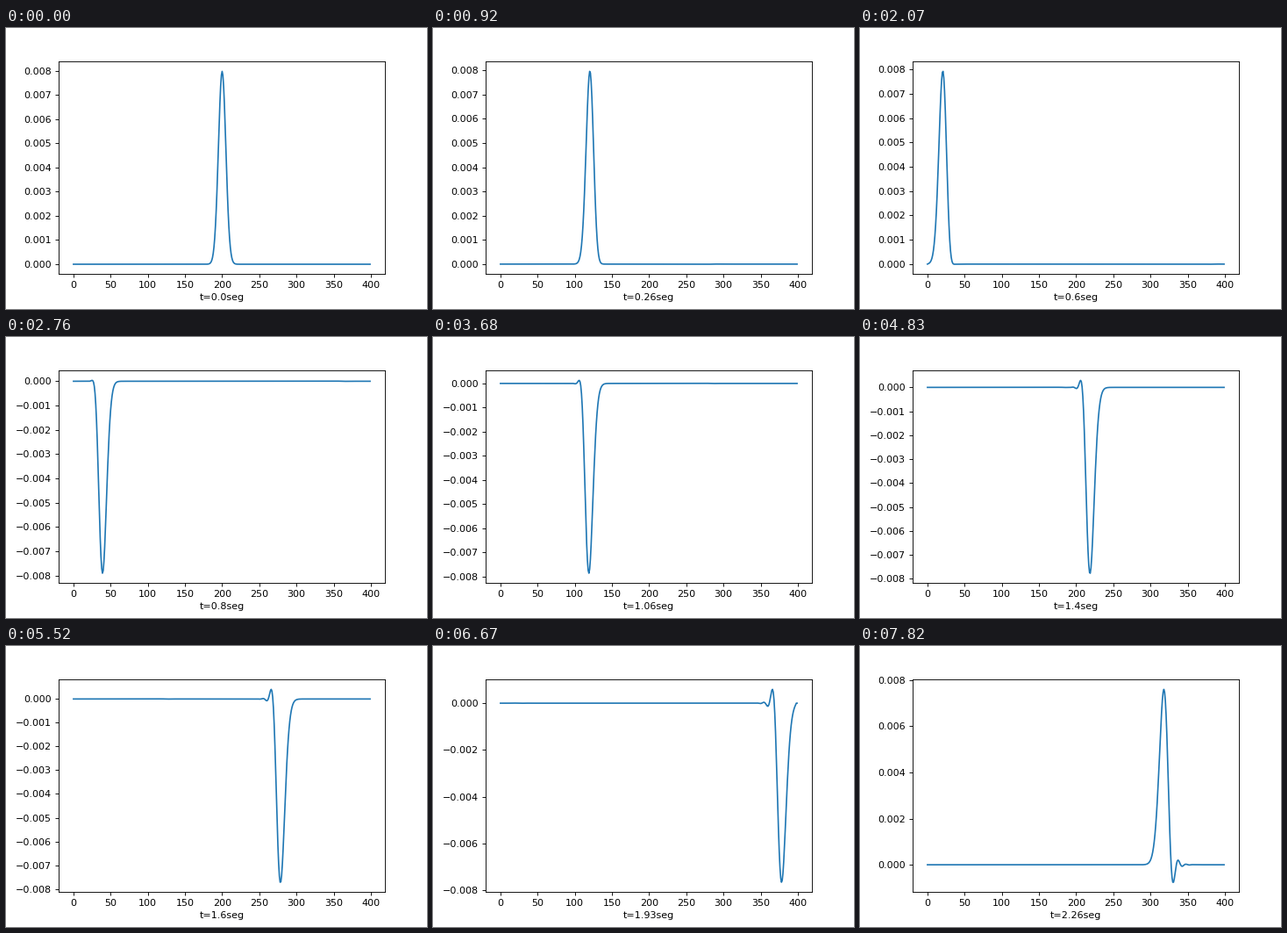
Write a matplotlib script that moves like this. It is 480 px wide and 320 px high and loops after 8 s.

```python
import numpy as np
import matplotlib.pyplot as plt
from matplotlib.animation import FuncAnimation

POINTS = 400
COURANT = 0.5          # cells travelled per time step
STEPS = 40             # time steps between two pictures
PICTURES = 35
HOLD = 230             # ms per picture
TICK = 40              # ms per animation frame
LOOP = 8000

x = np.arange(POINTS)


def pulse(shift):
    """Gaussian pulse of width 5, moved left by shift cells."""
    return 0.1 * np.exp(-(x - 200 + shift) ** 2 / 50) / (5 * np.sqrt(2 * np.pi))


def simulate():
    """Leapfrog solution of the wave equation on a string with fixed ends."""
    old, now = pulse(-COURANT), pulse(0)
    shots = [now]
    for n in range(1, (PICTURES - 1) * STEPS + 1):
        new = np.zeros(POINTS)
        bend = now[2:-1] - 2 * now[1:-2] + now[:-3]
        new[1:-2] = 2 * now[1:-2] - old[1:-2] + COURANT ** 2 * bend
        old, now = now, new
        if n % STEPS == 0:
            shots.append(now)
    return shots


shots = simulate()

fig, ax = plt.subplots(figsize=(6, 4), dpi=80)
fig.subplots_adjust(left=0.125, right=0.9, bottom=0.125, top=0.88)
line, = ax.plot(x, shots[0], color="#1f77b4", lw=1.5)


def draw(frame):
    i = min((frame * TICK + TICK - 1) // HOLD, PICTURES - 1)
    line.set_ydata(shots[i])
    ax.relim()
    ax.autoscale_view()
    seconds = (100 * i // 15) / 100
    ax.set_xlabel(f"t={seconds}seg")
    return line,


anim = FuncAnimation(fig, draw, frames=LOOP // TICK, interval=TICK,
                     init_func=lambda: draw(0), repeat=True, repeat_delay=0)
plt.show()
```
